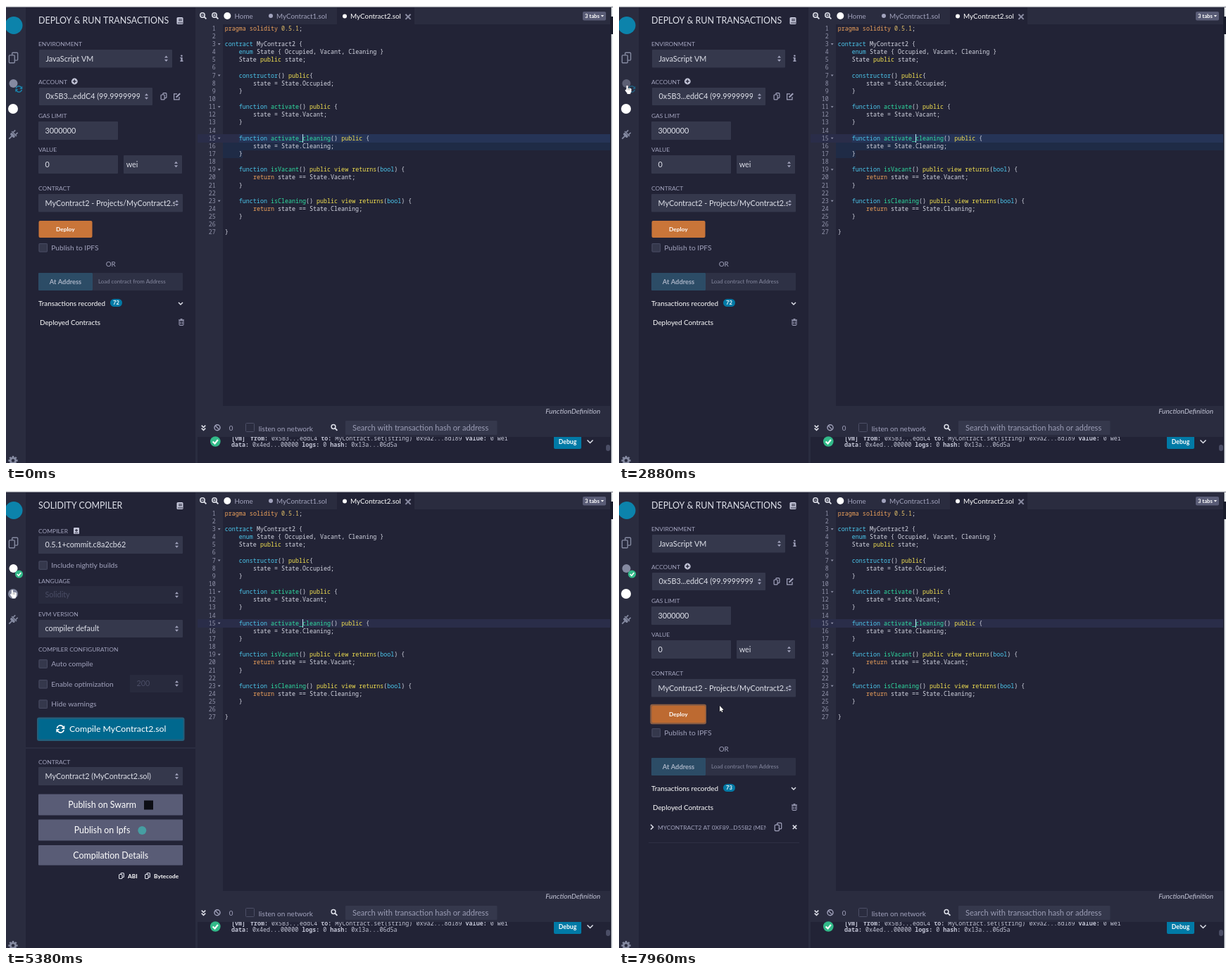
An HTML page with a canvas for the animation above (8 s loop, 862 by 649 pixels).

```html
<!DOCTYPE html>
<html lang="en">
<head>
<meta charset="utf-8">
<title>Contract deployment</title>
<style>
html, body { margin: 0; width: 100%; height: 100%; overflow: hidden; background: #222336; }
canvas { display: block; width: 862px; height: 649px; }
</style>
</head>
<body>
<canvas id="stage"></canvas>
<script>
const W = 862, H = 649, LOOP = 8000;
const cv = document.getElementById('stage');
const dpr = window.devicePixelRatio || 1;
cv.width = W * dpr;
cv.height = H * dpr;
const g = cv.getContext('2d');

const UI = 'Lato, "Open Sans", sans-serif';
const MONO = '"Noto Sans Mono", "DejaVu Sans Mono", monospace';
const C = {
  bg: '#222336', strip: '#2a2c3f', field: '#35384c', button: '#595c76', blue: '#007aa6',
  orange: '#c97539', green: '#32ba89', muted: '#a2a3bd', pale: '#dfe1ea', white: '#ffffff', dim: '#4b4e66'
};

// ---- drawing helpers ----
function rect(x1, y1, x2, y2, color, r = 0) {
  g.fillStyle = color;
  g.beginPath();
  g.roundRect(x1, y1, x2 - x1, y2 - y1, r);
  g.fill();
}
function frame(x1, y1, x2, y2, color, w = 1, r = 1) {
  g.strokeStyle = color;
  g.lineWidth = w;
  g.beginPath();
  g.roundRect(x1, y1, x2 - x1, y2 - y1, r);
  g.stroke();
}
function disc(x, y, r, color) {
  g.fillStyle = color;
  g.beginPath();
  g.arc(x, y, r, 0, Math.PI * 2);
  g.fill();
}
function ring(x, y, r, color, w = 1.2, a = 0, b = Math.PI * 2) {
  g.strokeStyle = color;
  g.lineWidth = w;
  g.beginPath();
  g.arc(x, y, r, a, b);
  g.stroke();
}
function line(color, w, ...p) {
  g.strokeStyle = color;
  g.lineWidth = w;
  g.beginPath();
  for (let i = 0; i < p.length; i += 2) g.lineTo(p[i], p[i + 1]);
  g.stroke();
}
function poly(color, ...p) {
  g.fillStyle = color;
  g.beginPath();
  for (let i = 0; i < p.length; i += 2) g.lineTo(p[i], p[i + 1]);
  g.closePath();
  g.fill();
}
// y is the middle of the capitals
function text(s, x, y, size, color, style = '', align = 'left') {
  g.font = `${style} ${size}px ${UI}`;
  g.textAlign = align;
  g.fillStyle = color;
  g.fillText(s, x, y + size * 0.36);
}
function clipped(x1, y1, x2, y2, draw) {
  g.save();
  g.beginPath();
  g.rect(x1, y1, x2 - x1, y2 - y1);
  g.clip();
  draw();
  g.restore();
}
function at(x, y, draw, turn = 0) {
  g.save();
  g.translate(x, y);
  g.rotate(turn);
  draw();
  g.restore();
}

// ---- icons ----
const chevron = (x, y, color, s = 3) => line(color, 1.5, x - s, y - s / 2, x, y + s / 2, x + s, y - s / 2);
function updown(x, y, color = C.muted) {
  poly(color, x - 2.5, y - 1.2, x, y - 4.2, x + 2.5, y - 1.2);
  poly(color, x - 2.5, y + 1.2, x, y + 4.2, x + 2.5, y + 1.2);
}
function copyIcon(x, y, s, color, bg, w = 1.2) {
  frame(x - s * 0.25, y - s, x + s * 0.85, y + s * 0.5, color, w);
  rect(x - s * 0.85, y - s * 0.5, x + s * 0.25, y + s, bg);
  frame(x - s * 0.85, y - s * 0.5, x + s * 0.25, y + s, color, w);
}
function refresh(x, y, r, color, turn = 0) {
  at(x, y, () => {
    for (let i = 0; i < 2; i++) {
      ring(0, 0, r, color, r * 0.36, Math.PI + 0.25, Math.PI * 2 - 0.4);
      poly(color, r * 1.2, -r, r * 1.2, 0, r * 0.2, 0);
      g.rotate(Math.PI);
    }
  }, turn);
}
function tick(x, y, r) {
  disc(x, y, r, C.green);
  line(C.white, r * 0.3, x - r * 0.5, y, x - r * 0.1, y + r * 0.4, x + r * 0.5, y - r * 0.35);
}
function zoom(x, y, color, sign, r = 3.2) {
  ring(x - 1, y - 1, r, color, 1.5);
  line(color, 1.8, x + 1.4, y + 1.4, x + 4.4, y + 4.4);
  if (sign) line(color, 1, x - 2.6, y - 1, x + 0.6, y - 1);
  if (sign === '+') line(color, 1, x - 1, y - 2.6, x - 1, y + 0.6);
}
function cross(x, y, s, color, w) {
  line(color, w, x - s, y - s, x + s, y + s);
  line(color, w, x + s, y - s, x - s, y + s);
}
function book() {
  rect(242.5, 16, 251.5, 26, '#c3c5d8', 1.5);
  line(C.bg, 1, 245, 18.8, 250, 18.8);
  line(C.bg, 1, 245, 20.8, 250, 20.8);
  line(C.bg, 1, 244, 24, 251, 24);
}
function plug(x, y, color) {
  at(x, y, () => {
    rect(-4.8, -3, 4.8, -1.4, color);
    rect(-4, -1, 4, 2.6, color, 2);
    rect(-3.2, -7, -1.6, -3, color);
    rect(1.6, -7, 3.2, -3, color);
    rect(-0.9, 2, 0.9, 8, color);
  }, Math.PI / 4);
}
function gear(x, y, color) {
  ring(x, y, 3.6, color, 2.6);
  for (let i = 0; i < 8; i++) at(x, y, () => rect(-1.3, -6.6, 1.3, -4, color), i * Math.PI / 4);
}
function trash(x, y) {
  line(C.muted, 1.2, x - 4, y - 3, x + 4, y - 3);
  line(C.muted, 1.2, x - 1.4, y - 4.3, x + 1.4, y - 4.3);
  frame(x - 3, y - 2.5, x + 3, y + 4.5, C.muted, 1);
  for (const d of [-1.2, 1.2]) line(C.muted, 0.8, x + d, y - 1, x + d, y + 3);
}

// ---- form parts ----
const label = (s, y) => text(s, 46, y, 8.45, C.muted);
function field(s, x1, y1, x2, y2, { arrows = true, off = false, left = 9.5, right = 11 } = {}) {
  const y = (y1 + y2) / 2;
  g.globalAlpha = off ? 0.35 : 1;
  rect(x1, y1, x2, y2, C.field, 1);
  g.globalAlpha = 1;
  clipped(x1, y1, x2 - right, y2, () => text(s, x1 + left, y, 10.8, off ? C.dim : C.pale));
  if (arrows) updown(x2 - 8.5, y);
}
function check(s, y) {
  rect(46.5, y - 6, 59, y + 6.5, C.field, 1);
  frame(47, y - 5.5, 58.5, y + 6, '#484b62', 1);
  text(s, 64.3, y, 10.2, C.muted);
}
function wideButton(s, y1, y2, cx) {
  rect(46, y1, 251, y2, C.button, 1);
  text(s, cx, (y1 + y2) / 2, 12.4, C.white, '', 'center');
}

// ---- side panels ----
function deployPanel(t) {
  const clicked = t >= 7430, done = t >= 7600;
  text('DEPLOY & RUN TRANSACTIONS', 46, 21, 12.45, C.pale);
  book();
  label('ENVIRONMENT', 53.5);
  field('JavaScript VM', 47, 62, 236, 87.5);
  rect(248.4, 73, 250.6, 78.5, C.muted);
  rect(247.3, 77.5, 251.6, 78.8, C.muted);
  rect(247.3, 73, 250, 74.2, C.muted);
  disc(249.4, 70.7, 1.3, C.muted);
  label('ACCOUNT', 107.5);
  disc(97.3, 107, 4.4, '#c3c5d8');
  line(C.bg, 1.3, 94.8, 107, 99.8, 107);
  line(C.bg, 1.3, 97.3, 104.5, 97.3, 109.5);
  field('0x5B3...eddC4 (99.999999999999', 47, 116, 208, 141, { right: 18 });
  copyIcon(224, 128.3, 4.6, C.muted, C.bg);
  line(C.muted, 1.2, 243, 124.8, 238.6, 124.8, 238.6, 132.8, 246, 132.8, 246, 129);
  line(C.muted, 2, 241.6, 129.8, 247.2, 124.2);
  label('GAS LIMIT', 155.5);
  field('3000000', 46, 164, 159, 190, { arrows: false });
  label('VALUE', 203.5);
  field('0', 46, 212, 159, 238, { arrows: false });
  field('wei', 167, 212, 250, 238, { left: 3.7 });
  label('CONTRACT', 258.5);
  field('MyContract2 - Projects/MyContract2.sol', 46, 267, 251, 292.5);

  if (clicked) rect(44.3, 302.8, 124, 331.2, '#8b5d42', 3);
  rect(46.5, 305, 122.5, 329, clicked ? '#bd6a31' : t >= 6870 ? '#b4662f' : C.orange, 2);
  text('Deploy', 84.3, 317, 8.3, C.white, 'bold', 'center');
  check('Publish to IPFS', 343);
  text('OR', 148.7, 366, 9.9, C.muted, '', 'center');
  rect(46, 379, 123, 404, '#2c4c66', 1);
  text('At Address', 84.5, 391.5, 9.3, '#aab4c6', 'bold', 'center');
  rect(123, 379, 251, 404, '#2e3145', 1);
  text('Load contract from Address', 131, 391.5, 7.9, '#85889f');
  text('Transactions recorded', 46, 422.5, 9.9, C.white);
  rect(148, 416, 165, 427, C.blue, 5.5);
  text(done ? '73' : '72', 156.5, 421.5, 7.6, C.white, 'bold', 'center');
  chevron(248, 422.5, C.pale);
  text('Deployed Contracts', 48, 449, 9.85, C.white);
  trash(249, 449);
  if (done) {
    line(C.pale, 1.5, 45, 473.8, 48.5, 477.2, 45, 480.6);
    clipped(50, 465, 208.5, 490, () => text('MYCONTRACT2 AT 0XF89...D55B2 (MEMORY)', 55, 477.5, 8.4, C.muted));
    copyIcon(226, 477, 5.6, C.muted, C.bg);
    cross(249.5, 477.3, 2.7, C.pale, 1.5);
    line('#2e3044', 1, 42, 499.5, 256, 499.5);
  }
}

function compilePanel(t) {
  const clicked = t >= 4300, hover = t >= 4060 && t < 4900;
  text('SOLIDITY COMPILER', 46, 21, 12.4, C.pale);
  book();
  label('COMPILER', 56.5);
  rect(96, 52, 104, 61, '#c3c5d8', 1);
  line(C.bg, 1.1, 98, 56, 102, 56);
  line(C.bg, 1.1, 100, 54, 100, 58);
  line(C.bg, 0.8, 97.5, 59.5, 102.5, 59.5);
  field('0.5.1+commit.c8a2cb62', 46, 64, 251, 89);
  check('Include nightly builds', 105.3);
  label('LANGUAGE', 128);
  field('Solidity', 46, 135, 251, 160, { off: true });
  label('EVM VERSION', 175);
  field('compiler default', 46, 183, 251, 208);
  label('COMPILER CONFIGURATION', 225);
  check('Auto compile', 245.3);
  check('Enable optimization', 274);
  field('200', 176, 261, 251, 286, { off: true });
  check('Hide warnings', 302.5);
  if (clicked) rect(44, 321.5, 253.5, 355, '#245f7b', 3);
  rect(46, 324, 251.5, 352.5, hover ? '#005c7e' : clicked ? '#00688e' : C.blue, 2);
  refresh(77.3, clicked ? 338 : 336, 5, C.white, t >= 4300 && t < 4500 ? (t - 4300) / 60 : 0);
  text('Compile MyContract2.sol', 90, 338, 12.3, C.white);
  line('#35384c', 1, 28, 365, 269, 365);
  label('CONTRACT', 385);
  field('MyContract2 (MyContract2.sol)', 46, 392, 251, 418);
  wideButton('Publish on Swarm', 430.5, 460.5, 136.5);
  rect(196, 439.5, 209, 452.5, '#0c0d14');
  wideButton('Publish on Ipfs', 466.5, 496.5, 136.5);
  disc(193.3, 482, 6, '#469ea2');
  wideButton('Compilation Details', 503, 531.5, 148.7);
  copyIcon(164, 546.5, 4, C.pale, C.bg, 1.1);
  text('ABI', 173, 547, 8.3, C.white, 'bold');
  copyIcon(201, 546.5, 4, C.pale, C.bg, 1.1);
  text('Bytecode', 210, 547, 8.3, C.white, 'bold');
}

function iconStrip(t, compiling) {
  rect(0, 2, 28, H, C.strip);
  disc(11, 27.5, 12.5, '#0c83ab');
  copyIcon(10.5, 73.5, 7.2, '#858aa1', C.strip, 1.4);
  g.globalAlpha = t >= 2730 && t < 2960 ? 0.55 : 1;
  disc(10.5, 110, 6, compiling ? C.white : '#858aa1');
  if (t < 4500) refresh(18.3, 118, 4.2, '#1b84ac', t >= 4300 ? (t - 4300) / 60 : 0);
  g.globalAlpha = 1;
  if (t >= 4500) tick(18.5, 118, 5.6);
  disc(10, 146, 7, compiling ? '#858aa1' : C.white);
  plug(10, 183, '#858aa1');
  gear(10, 645.5, '#858aa1');
}

// ---- editor ----
const CODE = `pragma solidity 0.5.1;

contract MyContract2 {
    enum State { Occupied, Vacant, Cleaning }
    State public state;

    constructor() public{
        state = State.Occupied;
    }

    function activate() public {
        state = State.Vacant;
    }

    function activate_cleaning() public {
        state = State.Cleaning;
    }

    function isVacant() public view returns(bool) {
        return state == State.Vacant;
    }

    function isCleaning() public view returns(bool) {
        return state == State.Cleaning;
    }

}`.split('\n');
const INK = {
  pragma: '#f0a35c', solidity: '#f0a35c', return: '#f0a35c',
  contract: '#4cc8ee', enum: '#4cc8ee', constructor: '#4cc8ee', function: '#4cc8ee', bool: '#4cc8ee',
  public: '#f2e050', view: '#f2e050', returns: '#f2e050'
};
const CH = 5.01, ROW = 11.135, TOP = 26.5, LEFT = 310.8;

function mono(s, x, y, color, style = '') {
  g.font = `${style} ${CH / 0.6}px ${MONO}`;
  g.textAlign = 'left';
  g.fillStyle = color;
  g.fillText(s, x, y);
}

function editor(t) {
  const row = n => Math.round(TOP + (n - 1) * ROW);
  rect(272, 26, 308, 568, C.strip);
  rect(272, row(15), 858, row(16), '#2a2d49');
  if (t < 4400) {
    // the marked range runs from the keyword to its closing brace
    const mark = 'rgba(20, 90, 170, 0.14)';
    rect(LEFT + 4 * CH, row(15), 858, row(16), mark);
    rect(308, row(16), 858, row(17), mark);
    rect(308, row(17), LEFT + 5 * CH, row(18), mark);
  }
  CODE.forEach((src, i) => {
    const y = TOP + i * ROW + 8.3, n = String(i + 1);
    mono(n, 297.8 - n.length * CH, y, '#9193aa');
    if (/^\s*(contract|constructor|function)/.test(src)) poly('#9193aa', 300.8, y - 4, 304.6, y - 4, 302.7, y - 1.6);
    let prev = '';
    for (const m of src.matchAll(/[\w.]+|[^\w\s.]+/g)) {
      const w = m[0];
      const color = prev === 'function' ? '#2fe0a3' : /^\d/.test(w) ? '#e8c46a' : INK[w] || '#d5d7e3';
      mono(w, LEFT + m.index * CH, y, color);
      prev = w;
    }
  });
  rect(421, row(15), 422, row(16), '#bfe6f2');
}

function tabs() {
  rect(272, 2, 858, 26, C.strip);
  rect(470, 2, 580, 26, C.bg);
  zoom(280, 14, C.pale, '-');
  zoom(297, 14, C.pale, '+');
  disc(314.3, 14, 5, C.white);
  text('Home', 324.5, 14.3, 9.8, C.muted);
  disc(376, 14, 3, C.muted);
  text('MyContract1.sol', 384, 14, 9.8, C.muted);
  disc(481, 14.5, 3, C.white);
  text('MyContract2.sol', 489, 14.3, 9.85, C.white);
  cross(571, 15.3, 3.6, '#8a8ca3', 2);
  rect(819, 8, 852, 20.5, C.button, 2);
  text('3 tabs', 822, 14.3, 7.7, C.white, 'bold');
  poly(C.white, 844.8, 13, 849, 13, 846.9, 15.5);
}

// words ending in ':' and the bracketed tag are bold
function log(s, x, y) {
  for (const m of s.matchAll(/\S+/g))
    mono(m[0], x + m.index * CH, y, '#c3c5d6', /:$|^\[/.test(m[0]) ? 'bold' : '');
}

function terminal() {
  rect(272, 568, 858, 612, C.strip);
  text('FunctionDefinition', 844, 575.5, 10.1, '#c3c5d6', 'italic', 'right');
  clipped(272, 612, 858, H, () => {
    log('[vm]', 320, 617);
    log('from: 0x5B3...eddC4 to: MyContract.set(string) 0x9a2...8d189 value: 0 wei', 347, 617);
    log('data: 0x4ed...00000 logs: 0 hash: 0x13a...06d5a', 320, 626.3);
    rect(778, 606, 817, 629, C.blue, 2);
    text('Debug', 797.5, 618.7, 8.6, C.white, 'bold', 'center');
  });
  tick(297.3, 618.5, 7.3);
  chevron(829.5, 618.5, C.pale, 4);
  rect(852, 623, 858, 632, '#4b4e66', 3);
  chevron(280.5, 597, C.pale, 2.8);
  chevron(280.5, 601, C.pale, 2.8);
  ring(300, 598.8, 4, C.muted, 1.4);
  line(C.muted, 1.3, 297.2, 596, 302.8, 601.6);
  text('0', 319.5, 599, 9.8, C.muted, '', 'center');
  frame(340.5, 592.5, 352.5, 604.5, '#4c4f66', 1);
  text('listen on network', 358.7, 600.5, 10.1, C.muted);
  zoom(466, 598.5, C.pale, '', 2.9);
  rect(482, 589, 697.5, 609, C.field, 1);
  text('Search with transaction hash or address', 492, 599, 11.1, '#9a9cb4');
}

// light window border with one dark stretch near the top
function border() {
  rect(858, 2, W, H, '#191c2c');
  rect(859.5, 2, W, 15, '#e9ecef');
  rect(859.5, 40, W, H, '#e9ecef');
  rect(0, 0, W, 1.6, '#eef0f2');
}

// ---- pointer: time, x, y ----
const PATH = [
  [140, 828, 644], [650, 310, 240], [790, 290, 150], [930, 340, 117], [1020, 345, 115], [1250, 365, 86],
  [1480, 328, 106], [1650, 322, 106], [2030, 45, 64], [2410, 18, 107], [2500, 13, 111], [2580, 11, 112.5],
  [3430, 13, 114], [3670, 142, 285], [4220, 174, 334], [4830, 172, 330], [5380, 9, 140.5],
  [6160, 10, 143], [6950, 102, 317], [7110, 100, 317], [7680, 102, 317], [7960, 143, 305]
];
const HAND = [[2450, 3470], [4060, 4900], [5300, 6240], [6870, 7800]];

function pointer(t) {
  if (t < PATH[0][0]) return;
  let i = PATH.findIndex(p => p[0] > t);
  if (i < 0) i = PATH.length - 1;
  const [t0, x0, y0] = PATH[i - 1], [t1, x1, y1] = PATH[i];
  const k = Math.min(1, (t - t0) / (t1 - t0));
  at(x0 + (x1 - x0) * k, y0 + (y1 - y0) * k, () => {
    if (HAND.some(([a, b]) => t >= a && t < b)) {
      rect(-1.2, 0, 1, 8, C.white, 1);
      rect(-1.2, 3.6, 5.8, 10, C.white, 1.5);
      poly(C.white, -1, 10, -3.2, 6.6, -2.4, 5.6, 0, 7);
      rect(-0.4, 8, 4.8, 12, C.white, 1);
      for (const x of [1.2, 3.1]) line('#444', 0.5, x, 4, x, 6.5);
    } else {
      g.lineJoin = 'round';
      const shape = [0, 0, 0, 8.2, 1.9, 6.5, 3.1, 9.2, 4.3, 8.7, 3.2, 6, 5.6, 5.8];
      line('#111', 1, ...shape, 0, 0);
      poly(C.white, ...shape);
      g.lineJoin = 'miter';
    }
  });
}

function draw(t) {
  const compiling = t >= 2960 && t < 5700;
  g.setTransform(dpr, 0, 0, dpr, 0, 0);
  rect(0, 0, W, H, C.bg);
  iconStrip(t, compiling);
  (compiling ? compilePanel : deployPanel)(t);
  rect(269, 2, 272, H, C.strip);
  editor(t);
  tabs();
  terminal();
  border();
  pointer(t);
}

const start = performance.now();
function tickFrame() {
  draw((performance.now() - start) % LOOP);
  requestAnimationFrame(tickFrame);
}
tickFrame();
</script>
</body>
</html>
```
